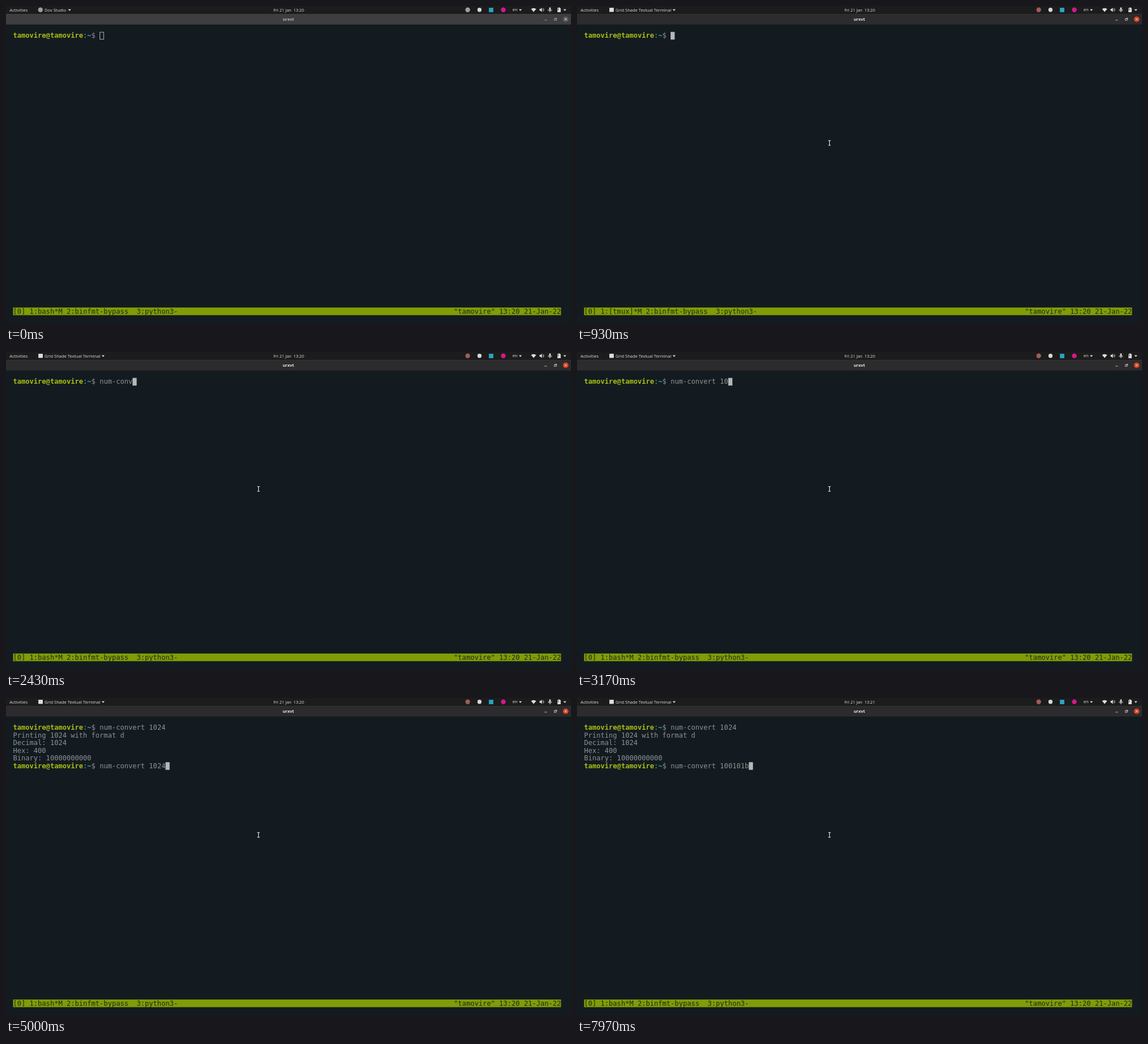
An HTML page with a canvas that plays this animation: 997x561 px, repeating every 8000 ms.

```html
<!DOCTYPE html>
<html lang="en">
<head>
<meta charset="utf-8">
<style>
html, body { margin: 0; width: 100%; height: 100%; overflow: hidden; background: #141b20; }
canvas { display: block; width: 997px; height: 561px; }
</style>
</head>
<body>
<canvas width="997" height="561"></canvas>
<script>
const ctx = document.querySelector('canvas').getContext('2d');
const LOOP = 8000, FOCUS = 500;
const USER = 'tamovire', COMMAND = 'num-convert 1024';
const LEFT = 24, TOP = 88, CELL = 14, ROW = 26, COLS = 133;
const GREY = '#8b9394', LIME = '#a6c013', CYAN = '#35a3bd', LIGHT = '#dedede';
const OUTPUT = [
  'Printing 1024 with format d', 'Decimal: 1024', 'Hex: 400', 'Binary: 10000000000'
];
// Time of each key press on the first prompt line
const KEYS = [1270, 1370, 1430, 1570, 1670, 1800, 1930, 2330,
  2770, 2830, 2930, 2970, 3070, 3150, 3330, 3430];
const ENTER = 3830;
// Later edits of the second prompt line: [time, argument]
const EDITS = [[4730, '1024'], [5200, '102'], [5400, '10'], [6100, '100'],
  [6570, '1001'], [6720, '10010'], [6870, '100101'], [7270, '100101b']];

// All drawing uses a 1920 x 1080 desktop
ctx.setTransform(997 / 1920, 0, 0, 561 / 1080, 0, 0);

function rect(x, y, w, h, color) {
  ctx.fillStyle = color;
  ctx.fillRect(x, y, w, h);
}

function circle(x, y, r, color) {
  ctx.fillStyle = color;
  ctx.beginPath();
  ctx.arc(x, y, r, 0, 7);
  ctx.fill();
}

function line(points, color, width = 2) {
  ctx.strokeStyle = color;
  ctx.lineWidth = width;
  ctx.beginPath();
  points.forEach(([x, y]) => ctx.lineTo(x, y));
  ctx.stroke();
}

function poly(points, color) {
  ctx.fillStyle = color;
  ctx.beginPath();
  points.forEach(([x, y]) => ctx.lineTo(x, y));
  ctx.fill();
}

function label(text, x, y, size, color = LIGHT, weight = 400, align = 'left') {
  ctx.font = `${weight} ${size}px "Open Sans", sans-serif`;
  ctx.textAlign = align;
  ctx.fillStyle = color;
  ctx.fillText(text, x, y);
}

function term(text, col, row, color = GREY, weight = 400) {
  ctx.font = `${weight} 23.25px "DejaVu Sans Mono", monospace`;
  ctx.textAlign = 'left';
  ctx.fillStyle = color;
  ctx.fillText(text, LEFT + col * CELL, TOP + row * ROW + 20.5);
}

function arrow(x) {
  poly([[x - 5, 11], [x + 5, 11], [x, 17]], LIGHT);
}

function prompt(row, text) {
  const who = `${USER}@${USER}`;
  term(who, 0, row, LIME, 700);
  term(':', who.length, row);
  term('~', who.length + 1, row, CYAN, 700);
  term('$ ' + text, who.length + 2, row);
  return who.length + 4 + text.length;
}

function caret(col, row, solid) {
  const x = LEFT + col * CELL, y = TOP + row * ROW;
  if (solid) return rect(x, y, CELL, ROW, '#b3b9b9');
  ctx.strokeStyle = '#a9b0b0';
  ctx.lineWidth = 2;
  ctx.strokeRect(x + 1, y + 1, CELL - 1, ROW - 2);
}

function tray(focused) {
  circle(1569, 13, 8, focused ? '#a25b5b' : '#a0a0a0');
  circle(1609, 13, 7, '#d8d8d8');
  rect(1641, 6, 15, 15, '#2ba3c4');
  circle(1690, 13, 8, '#d5178d');
  label('en', 1721, 18, 15);
  arrow(1748);
  // Wi-Fi
  ctx.fillStyle = LIGHT;
  ctx.beginPath();
  ctx.moveTo(1793, 20);
  ctx.arc(1793, 20, 13, -2.3, -0.84);
  ctx.fill();
  // Speaker
  poly([[1813, 10], [1816, 10], [1821, 6], [1821, 20], [1816, 16], [1813, 16]], LIGHT);
  ctx.strokeStyle = LIGHT;
  ctx.lineWidth = 1.5;
  for (const r of [4, 7]) {
    ctx.beginPath();
    ctx.arc(1821, 13, r, -0.9, 0.9);
    ctx.stroke();
  }
  // Microphone
  rect(1846, 5, 5, 10, LIGHT);
  line([[1843, 11], [1843, 16], [1854, 16], [1854, 11]], LIGHT, 1.5);
  line([[1848.5, 16], [1848.5, 21]], LIGHT);
  // Battery
  rect(1877, 5, 5, 3, LIGHT);
  rect(1874, 7, 11, 14, LIGHT);
  rect(1876, 9, 2, 5, '#1c1c1c');
  arrow(1899);
}

function desktop(t, focused) {
  rect(0, 0, 1920, 27, '#1c1c1c');
  label('Activities', 12, 18.5, 15);
  if (focused) rect(110, 6, 15, 14, '#dddddd');
  else circle(117, 13, 8, '#a0a0a0');
  label(focused ? 'Grid Shade Textual Terminal' : 'Dov Studio', 131, 18.5, 14.5);
  arrow(focused ? 330 : 216);
  label('Fri 21 Jan\u2002' + (t < 5900 ? '13:20' : '13:21'), 961, 18.5, 14.2, LIGHT, 400, 'center');
  tray(focused);

  rect(0, 27, 1920, 37, focused ? '#2c2b2d' : '#3e3d3f');
  rect(0, 27, 1920, 1.5, focused ? '#373638' : '#454446');
  rect(0, 63, 1920, 1.5, '#101416');
  const ink = focused ? '#e6e6e6' : '#b4b4b4';
  label('urxvt', 959.5, 50, 14.4, ink, 700, 'center');
  line([[1830, 48], [1838, 48]], ink, 1.5);
  ctx.lineWidth = 1.3;
  ctx.strokeRect(1863.5, 43, 6, 6);
  line([[1865.5, 41], [1871.5, 41], [1871.5, 47]], ink, 1.3);
  circle(1902, 45, 9.5, focused ? '#dc4322' : '#5b5a5c');
  line([[1898.5, 41.5], [1905.5, 48.5]], '#f0f0f0', 1.8);
  line([[1905.5, 41.5], [1898.5, 48.5]], '#f0f0f0', 1.8);
}

function terminal(t, focused) {
  const typed = KEYS.filter(k => k <= t).length;
  let row = 0, col = prompt(0, COMMAND.slice(0, typed));
  if (t >= ENTER) {
    OUTPUT.forEach((text, i) => term(text, 0, i + 1));
    row = OUTPUT.length + 1;
    const edit = EDITS.filter(e => e[0] <= t).pop();
    col = prompt(row, edit ? 'num-convert ' + edit[1] : '');
  }
  caret(col, row, focused);

  const name = t >= 800 && t < 970 ? '[tmux]' : 'bash';
  const clock = `"${USER}" 13:20 21-Jan-22`;
  rect(LEFT, TOP + 36 * ROW, COLS * CELL, ROW, '#809c06');
  term(`[0] 1:${name}*M 2:binfmt-bypass  3:python3-`, 0, 36, '#1c2a1a');
  term(clock, COLS - clock.length, 36, '#1c2a1a');
}

function pointer(t) {
  if (t < 30) return;
  const p = Math.min(1, (t - 30) / 450), ease = 1 - (1 - p) ** 3;
  const x = 858 * ease, y = 520 - 55 * ease;
  for (const [color, w] of [['#0a0d0f', 5], ['#f2f2f2', 2.2]]) {
    line([[x - 4, y - 8], [x + 4, y - 8]], color, w);
    line([[x - 4, y + 8], [x + 4, y + 8]], color, w);
    line([[x, y - 8], [x, y + 8]], color, w);
  }
}

function draw(t) {
  const focused = t >= FOCUS;
  rect(0, 0, 1920, 1080, '#141b20');
  desktop(t, focused);
  terminal(t, focused);
  pointer(t);
}

const start = performance.now();
function tick() {
  draw((performance.now() - start) % LOOP);
  requestAnimationFrame(tick);
}
tick();
</script>
</body>
</html>
```
